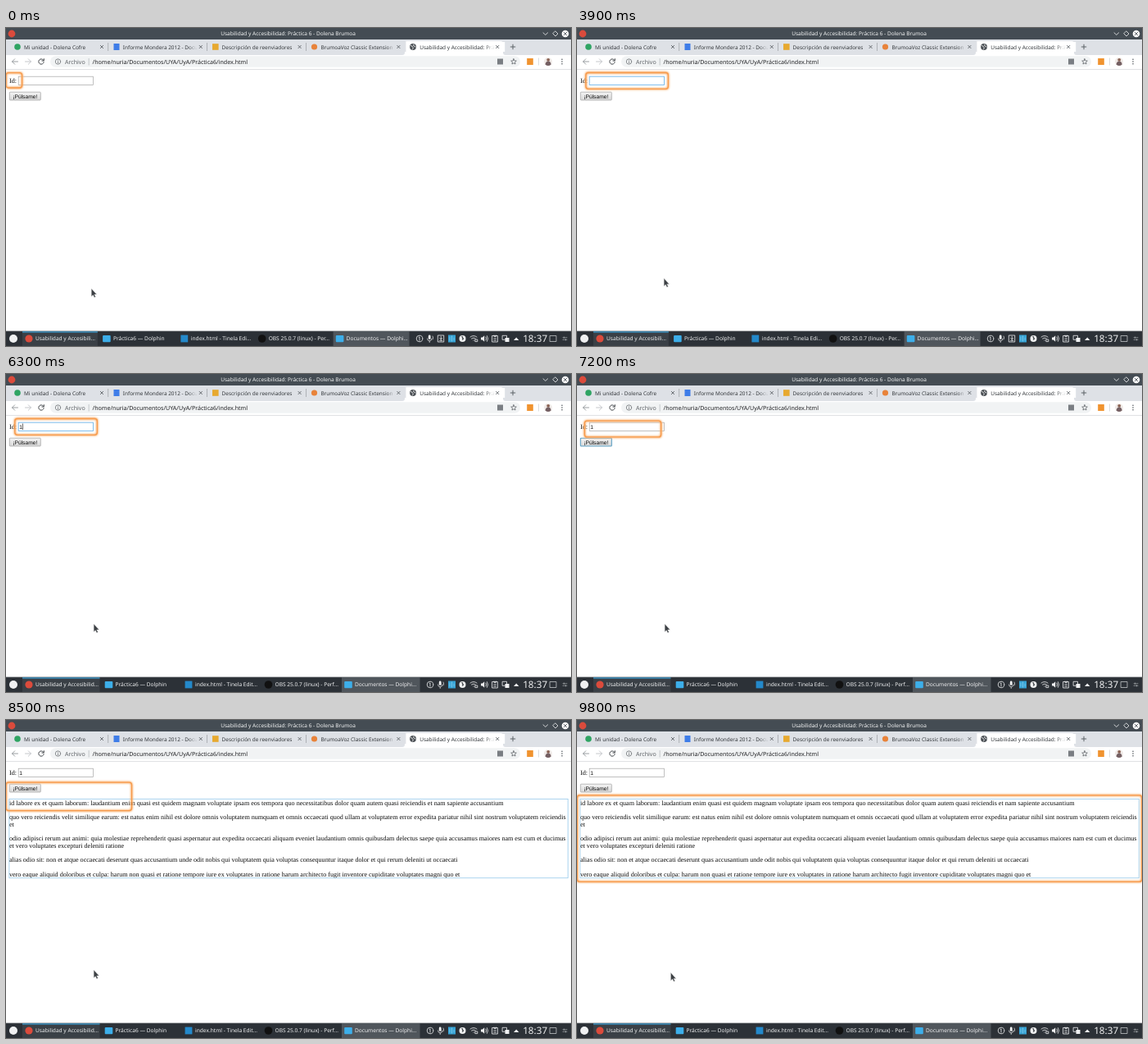
These frames come from a looping animation (690x388 px, 9900 ms). An HTML page:

```html
<!DOCTYPE html>
<html lang="es">
<head>
<meta charset="utf-8">
<title>Usabilidad y Accesibilidad</title>
<style>
html, body { margin: 0; width: 100%; height: 100%; overflow: hidden; background: #fff; }
svg { display: block; width: 690px; height: 388px; }
text { white-space: pre; text-rendering: geometricPrecision; font-family: "Noto Sans", sans-serif; }
.page { font: 8.08px "Liberation Serif", serif; fill: #0c0c0c; }
.label { font: 6.73px "Liberation Sans", sans-serif; fill: #0c0c0c; }
.line { fill: none; stroke-linecap: round; stroke-linejoin: round; }
#ring { fill: none; stroke: #f79a4b; stroke-width: 1.3; filter: drop-shadow(0 0 .8px #f7a45c) drop-shadow(0 0 1.3px #fbc795); }
</style>
</head>
<body>
<svg id="stage" viewBox="0 0 690 388"></svg>
<script>
const LOOP = 9900, STEP = 100;
const T = { focusInput: 3100, typed: 6100, focusButton: 7100, results: 8200 };

const rect = (x, y, w, h, fill, extra = '') =>
  `<rect x="${x}" y="${y}" width="${w}" height="${h}" fill="${fill}" ${extra}/>`;
const dot = (x, y, r, fill, extra = '') => `<circle cx="${x}" cy="${y}" r="${r}" fill="${fill}" ${extra}/>`;
const line = (d, color, width = 0.9) => `<path class="line" d="${d}" stroke="${color}" stroke-width="${width}"/>`;
const text = (x, y, size, fill, str, extra = '') =>
  `<text x="${x}" y="${y}" font-size="${size}" fill="${fill}" ${extra}>${str}</text>`;
const styled = (cls, x, y, str, extra = '') => `<text class="${cls}" x="${x}" y="${y}" ${extra}>${str}</text>`;
const group = (id, body) => `<g id="${id}">${body}</g>`;

function titleBar() {
  return rect(0, 0, 690, 14, '#444c53') + dot(7, 7, 4.4, '#db4b3c') +
    text(344.5, 9.3, 6.5, '#f4f5f5', 'Usabilidad y Accesibilidad: Práctica 6 - Dolena Brumoa', 'text-anchor="middle"') +
    line('M656 5.8l2.8 2.6 2.8-2.6M671 4l3 3-3 3-3-3z', '#f4f5f5', 0.8) +
    dot(683, 7, 4.3, '#fcfcfc') + line('M681.3 5.3l3.4 3.4m0-3.4l-3.4 3.4', '#444b52', 0.8);
}

function tabs() {
  const titles = ['Mi unidad - Dolena Cofre', 'Informe Mondera 2012 - Docu', 'Descripción de reenviadores',
    'BrumoaVoz Classic Extension', 'Usabilidad y Accesibilidad: Prá'];
  const icons = [
    dot(14, 23, 3.8, '#2fa463'),
    rect(131.5, 19, 7, 8, '#3f7de8'),
    rect(252, 19.2, 7.6, 7.6, '#e7a92f'),
    dot(376.5, 23, 3.6, '#e8833a'),
    dot(497, 23, 3.9, '#4b5055') + line('M494.3 21.5l2 1 1 2-1 1.5M498 20l-.4 1.5 2.4 1.5', '#fff', 0.8),
  ];
  let out = rect(0, 14, 690, 19, '#dee1e6') +
    '<path d="M484 33q3 0 3-3V19q0-3 3-3h114q3 0 3 3v11q0 3 3 3z" fill="#fff"/>';
  titles.forEach((title, i) => {
    const x = 22 + i * 120.8, fade = i === 4 ? 'fadeOn' : 'fadeOff', bg = i === 4 ? '#fff' : '#dee1e6';
    out += icons[i] + text(x, 25.5, 6.45, '#33373b', title);
    if (i && i !== 2) out += rect(x + 80, 17, 10, 12, `url(#${fade})`) + rect(x + 90, 17, 14, 12, bg);
    out += line(`M${x + 93.3} 21.3l3.4 3.4m0-3.4l-3.4 3.4`, '#50555a', 0.8);
    if (i < 3) out += rect(x + 102.5, 18, 0.6, 10, '#8d9196');
  });
  return out + line('M616.2 23h5.6M619 20.2v5.6', '#50555a', 0.9);
}

function toolbar() {
  const star = [...Array(10)].map((_, i) => {
    const r = i % 2 ? 1.6 : 3.5, a = i * Math.PI / 5;
    return `${(620 + r * Math.sin(a)).toFixed(2)} ${(41.2 - r * Math.cos(a)).toFixed(2)}`;
  }).join('L');
  return rect(0, 33, 690, 17, '#fff') + rect(54, 34.3, 574, 13.4, '#f1f3f4', 'rx="6.7"') +
    rect(0, 50, 690, 0.7, '#d3d5d8') +
    line('M14.5 41h-7m3.2-3.2L7.5 41l3.2 3.2', '#8f9397') + line('M23.5 41h7m-3.2-3.2l3.2 3.2-3.2 3.2', '#bfc1c4') +
    line('M45.7 39.2a3.2 3.2 0 1 0 .5 2.4M46.3 37.6v2.4h-2.4', '#44484c', 1) +
    line('M66.7 41a3.2 3.2 0 1 1-6.4 0a3.2 3.2 0 1 1 6.4 0M63.5 40.8v2M63.5 39.2v.1', '#5f6368', 0.7) +
    text(72, 43.6, 7.07, '#5f6368', 'Archivo') + rect(100.8, 37, 0.6, 8.5, '#a9acaf') +
    text(105.6, 43.6, 7.07, '#202124', '/home/nuria/Documentos/UYA/UyA/Práctica6/index.html') +
    rect(600, 37.5, 7, 7, '#7a7e83') + line(`M${star}z`, '#5f6368', 0.8) +
    rect(636.2, 37, 7.6, 8, '#f0932f') + rect(650, 36.5, 0.6, 9, '#c4c7ca') +
    dot(662, 41, 5, '#f0ebe8') + dot(662.2, 38.8, 1.9, '#8a6254') +
    '<path d="M658.5 44.5q.8-4 3.7-4t3.5 4q-3.5 3-7.2 0z" fill="#745f62"/>' +
    [38.3, 41, 43.7].map(y => dot(679, y, 0.8, '#50555a')).join('');
}

function form() {
  return styled('page', 4, 66.8, 'Id:') +
    '<rect id="input" x="15.2" y="59.2" width="91.3" height="10.2" fill="#fff"/>' +
    group('digit', styled('label', 16.3, 66.7, '1')) + group('caret', rect(16, 60.5, 0.6, 7.6, '#000')) +
    '<rect id="button" x="4.3" y="78.2" width="38" height="9.8" rx=".8" fill="url(#face)"/>' +
    styled('label', 23.3, 85.5, '¡Púlsame!', 'text-anchor="middle"');
}

function results() {
  const lines = [
    [103.6, 'id labore ex et quam laborum: laudantium enim quasi est quidem magnam voluptate ipsam eos tempora quo necessitatibus dolor quam autem quasi reiciendis et nam sapiente accusantium'],
    [120.8, 'quo vero reiciendis velit similique earum: est natus enim nihil est dolore omnis voluptatem numquam et omnis occaecati quod ullam at voluptatem error expedita pariatur nihil sint nostrum voluptatem reiciendis'],
    [129.9, 'et'],
    [147.1, 'odio adipisci rerum aut animi: quia molestiae reprehenderit quasi aspernatur aut expedita occaecati aliquam eveniet laudantium omnis quibusdam delectus saepe quia accusamus maiores nam est cum et ducimus'],
    [156.2, 'et vero voluptates excepturi deleniti ratione'],
    [173.4, 'alias odio sit: non et atque occaecati deserunt quas accusantium unde odit nobis qui voluptatem quia voluptas consequuntur itaque dolor et qui rerum deleniti ut occaecati'],
    [190.5, 'vero eaque aliquid doloribus et culpa: harum non quasi et ratione tempore iure ex voluptates in ratione harum architecto fugit inventore cupiditate voluptates magni quo et'],
  ];
  return lines.map(([y, str]) => styled('page', 4, y, str)).join('') +
    rect(3.9, 96.3, 682.3, 96.5, 'none', 'stroke="#86c1e8" stroke-width=".7"');
}

// The tray loses one icon later on, which gives every task a little more room.
function tasks(pitch, names, trayStart, withDownload) {
  const folder = x => rect(x - 4.8, 375, 9.6, 8.2, '#3daee9', 'rx="1"');
  const icons = [
    x => dot(x, 379, 4.6, '#db4b3c'),
    folder,
    x => rect(x - 4.4, 374.6, 8.8, 8.8, '#2489ca'),
    x => dot(x, 379, 4.8, '#111'),
    folder,
  ];
  const tray = [
    x => line(`M${x + 3.8} 379a3.8 3.8 0 1 1-7.6 0a3.8 3.8 0 1 1 7.6 0M${x - .8} 377.5l.8-.6v4.2`, '#eff0f1', 0.8),
    x => rect(x - 2.3, 374.5, 2.8, 5.4, '#eff0f1', 'rx="1.4"') +
      line(`M${x - 3.6} 379q0 2.8 2.7 2.8t2.7-2.8M${x - .9} 382v1.6M${x + 3} 376q1.2 2 0 4`, '#eff0f1', 0.7),
    x => line(`M${x - 3.5} 375h7v8h-7zM${x} 376.5v3.5m-1.5-1.4l1.5 1.4 1.5-1.4M${x - 1.5} 381.4h3`, '#eff0f1', 0.8),
  ];
  if (!withDownload) tray.pop();
  return rect(20, 370, pitch - 3, 18, '#3a4046') + rect(20, 370.4, pitch - 3, 1.1, '#3daee9') +
    rect(20 + 4 * pitch, 370, pitch - 2, 18, '#50565c') +
    names.map((name, i) => icons[i](28 + i * pitch) + text(36 + i * pitch, 381.4, 6.6, '#eff0f1', name)).join('') +
    tray.map((draw, i) => draw(trayStart + i * 13.1)).join('');
}

function taskBar() {
  const white = '#eff0f1';
  return rect(0, 370, 690, 18, '#2c3137') + rect(0, 369.6, 690, 0.7, '#53585d') + dot(9, 379, 5, white) +
    group('tasksA', tasks(94.9, ['Usabilidad y Accesibili…', 'Práctica6 — Dolphin', 'index.html - Tinela Edi…',
      'OBS 25.0.7 (linux) - Per…', 'Documentos — Dolphi…'], 505, true)) +
    group('tasksB', tasks(97.5, ['Usabilidad y Accesibilid…', 'Práctica6 — Dolphin', 'index.html - Tinela Edit…',
      'OBS 25.0.7 (linux) - Perf…', 'Documentos — Dolphi…'], 518, false)) +
    rect(540, 374.5, 9, 9, '#36a3d5') + line('M542 377v4m2.5-5v6m2.5-4v3', '#a5dcf2', 0.6) +
    dot(557.5, 379, 4, white) + line('M556.3 376.5l2.6 2.6-1.3 1.4v-4', '#2c3137', 0.8) +
    line('M567 377q4-3 8 0M568.5 379q2.5-2 5 0M571 381v.2M573.2 380h2.6v2.6h-2.6z', white, 0.8) +
    `<path d="M580 377.6h1.8l2.4-2.4v7.6l-2.4-2.4H580z" fill="${white}"/>` +
    line('M586 377q1.4 2 0 4M587.5 375.6q2.2 3.4 0 6.8', white, 0.8) +
    line('M594 375.5h6.4v7.5H594zM596 375v1.4h2.4V375M595.8 378.8h2.6M595.8 381h2.6', white, 0.8) +
    line('M606.5 375.3h5v5h-5z', white, 0.8) + rect(609.5, 378, 5, 5, white) +
    `<path d="M620 381l3.2-3.6 3.2 3.6z" fill="${white}"/>` +
    text(631.2, 383.2, 11.7, white, '18:37') +
    line('M664.5 375.5h7.5v7h-7.5z', '#d5d7d8', 0.7) + line('M680 377.7h5M680 380.3h5M681.5 376.9v1.6M683.5 379.5v1.6', '#a4a8ab', 0.7);
}

const fade = (id, color) => `<linearGradient id="${id}"><stop stop-color="${color}" stop-opacity="0"/>
  <stop offset="1" stop-color="${color}"/></linearGradient>`;

document.getElementById('stage').innerHTML = `<defs>${fade('fadeOn', '#fff')}${fade('fadeOff', '#dee1e6')}
  <linearGradient id="face" x2="0" y2="1"><stop stop-color="#f4f4f4"/><stop offset="1" stop-color="#d8d8d8"/></linearGradient></defs>` +
  rect(0, 0, 690, 388, '#fff') + form() + group('results', results()) + '<rect id="ring" rx="3"/>' +
  titleBar() + tabs() + toolbar() + taskBar() +
  '<path id="cursor" d="M0 0v9.6l2.1-1.9 1.5 3.1 1.5-.7-1.5-3h2.8z" fill="#3c4044" stroke="#dcdcdc" stroke-width=".4"/>';

const el = id => document.getElementById(id);
const show = (id, on) => el(id).setAttribute('visibility', on ? 'visible' : 'hidden');
const set = (id, attrs) => Object.entries(attrs).forEach(([k, v]) => el(id).setAttribute(k, v));
const clamp = p => Math.min(1, Math.max(0, p));
const mix = (a, b, p) => a.map((v, i) => v + (b[i] - v) * p);

// cubic-bezier(.25, .1, .25, 1)
function ease(p) {
  if (p <= 0 || p >= 1) return clamp(p);
  let lo = 0, hi = 1, s;
  for (let i = 0; i < 20; i++) {
    s = (lo + hi) / 2;
    const x = 0.75 * s * (1 - s) ** 2 + 0.75 * s * s * (1 - s) + s ** 3;
    if (x < p) lo = s; else hi = s;
  }
  return 0.3 * s * (1 - s) ** 2 + 3 * s * s * (1 - s) + s ** 3;
}

// Each key: start, duration, values to reach.
const follow = (t, first, keys) =>
  keys.reduce((now, [start, span, goal]) => mix(now, goal, ease(clamp((t - start) / span))), first);

const RING = [[3050, 400, [10.8, 54.5, 111.4, 74.3]], [7150, 400, [0, 73, 47.3, 93.4]], [8444, 400, [0.2, 91.9, 689.8, 197.3]]];
const CURSOR = [[0, 700, [106.2, 305.4]], [6000, 100, [107.2, 305]], [9600, 200, [114.5, 308.3]]];

function caretVisible(t) {
  if (t < T.focusInput || t >= T.focusButton) return false;
  if (t >= T.typed) return t < T.typed + 500;
  return t < 3800 || (t >= 4400 && t < 4900) || t >= 5500;
}

function draw(now) {
  const t = Math.floor(now % LOOP / STEP) * STEP;
  const inputFocus = t >= T.focusInput && t < T.focusButton;
  const buttonFocus = t >= T.focusButton && t < T.results;
  const typed = t >= T.typed;

  set('input', { stroke: inputFocus ? '#6fb5ea' : '#a5a5a5', 'stroke-width': inputFocus ? 0.9 : 0.7 });
  set('button', { stroke: buttonFocus ? '#5b9fc4' : '#a0a0a0', 'stroke-width': buttonFocus ? 1.1 : 0.7 });
  show('digit', typed);
  show('caret', caretVisible(t));
  set('caret', { transform: `translate(${typed ? 4 : 0.5} 0)` });
  show('results', t >= T.results);
  show('tasksA', !typed);
  show('tasksB', typed);

  const [x, y, right, bottom] = follow(t, [0, 54.6, 19.6, 73], RING);
  set('ring', { x, y, width: right - x, height: bottom - y });
  set('cursor', { transform: `translate(${follow(t, [104.3, 318], CURSOR).join(' ')})` });
  requestAnimationFrame(() => draw(performance.now() - begin));
}

const begin = performance.now();
draw(0);
</script>
</body>
</html>
```
